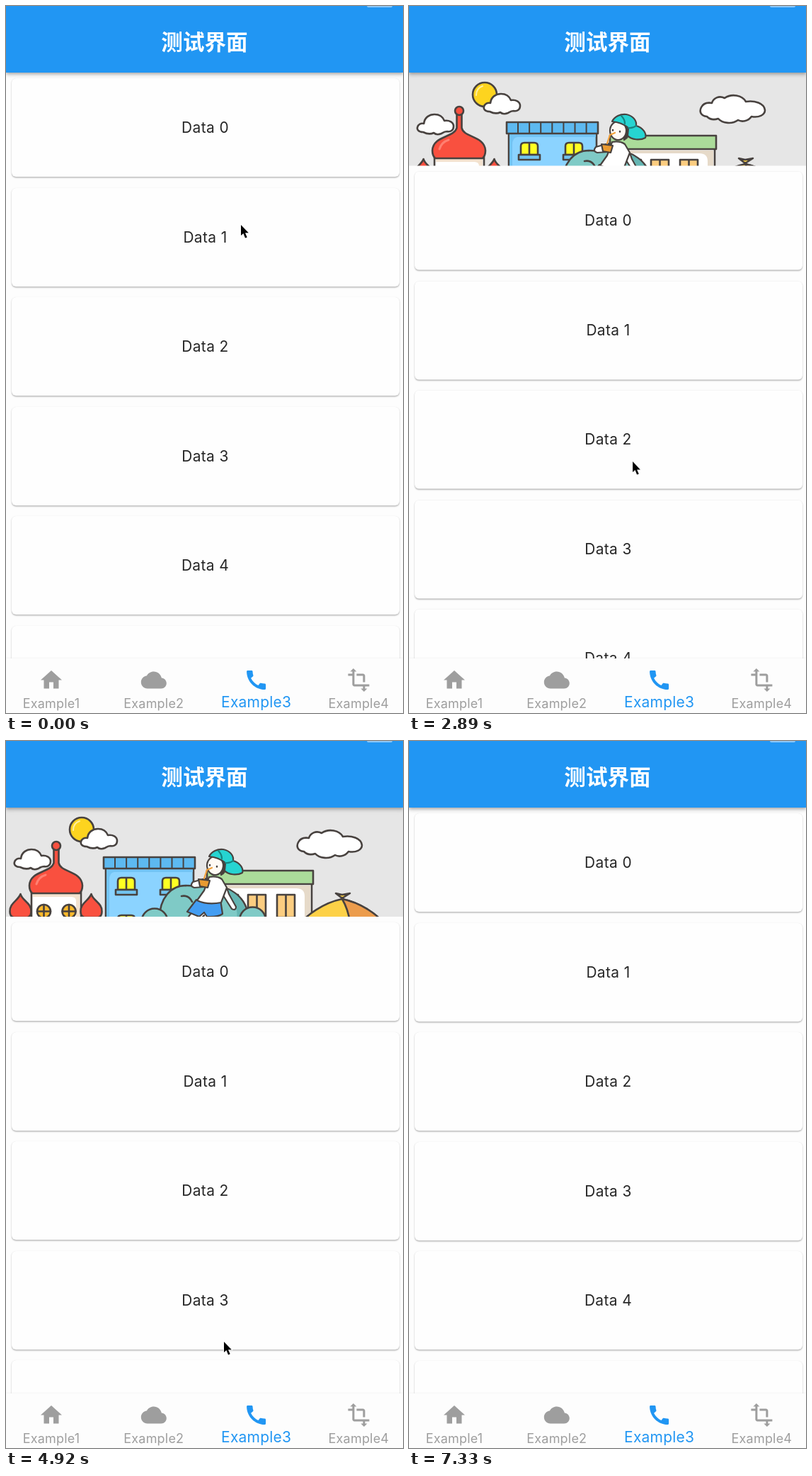
Write an HTML page that moves like this. It is 561x998 px and loops after 8 s.

```html
<!DOCTYPE html>
<html lang="zh">
<head>
<meta charset="utf-8">
<style>
html, body { margin: 0; width: 100%; height: 100%; overflow: hidden; background: #fdfdfd; }
body { position: relative; font-family: Inter, Roboto, sans-serif; }
body > * { position: absolute; left: 0; }
svg { display: block; top: 0; overflow: hidden; }
#list { top: 94px; width: 561px; height: 1000px; background: #fdfdfd; }
.card {
  position: absolute; left: 7.5px; width: 548px; height: 139px; border-radius: 6px;
  background: #fefefe; box-shadow: 0 1.5px 2px rgba(0,0,0,.27), 0 0 1px rgba(0,0,0,.1);
  font-size: 20.9px; letter-spacing: .4px; color: #262626;
  display: flex; align-items: center; justify-content: center;
}
#bar {
  top: 0; width: 561px; height: 94px; background: #2196f3;
  box-shadow: 0 2px 4px rgba(0,0,0,.25), 0 4px 6px rgba(0,0,0,.1);
  font: 600 30.6px/98px "Noto Sans CJK SC", "Noto Sans CJK", sans-serif; color: #fff; text-align: center;
}
#bar i { position: absolute; left: 510px; top: -3px; width: 36px; height: 5px; border-radius: 2px; background: #8ac6f8; }
#tabs { top: 921px; background: #fdfdfd; box-shadow: 0 -1px 2px rgba(0,0,0,.04); }
</style>
</head>
<body>
<svg id="scene" width="561" height="330">
  <defs>
    <path id="cloud" fill="#fff" d="M9 26C2 26 0 22 1 19c1-4 5-6 9-5C11 5 18 1 25 1s12 4 14 9c7-1 13 2 13 8 0 5-4 8-9 7-4 0-5 1-8 3-5 2-9 1-11-1-4 2-9 2-15-1Z"/>
    <g id="turret">
      <path fill="#fff" d="M-10 32H11V90H-10Z"/>
      <path fill="#fcc035" d="M-6 90V48a6.500 6.500 0 0 1 13 0V90M0 41V90M-6 50H7"/>
      <path fill="#f9503f" d="M0 0C2 9 16 13 15 25c0 4-2 7-5 8H-10c-3-1-5-4-5-8C-16 13-3 9 0 0Z"/>
    </g>
    <g id="rose" fill="#fcb92c"><circle r="9.500"/><path d="M-9.500 0H9.500M0-9.500V9.500"/></g>
    <g id="pane">
      <path fill="#ff2" d="M-12 8V-4Q-12-9-7-9H7Q12-9 12-4V8ZM0-9V8"/>
      <path fill="#72c4f0" d="M-15 8H15V15H-15Z"/>
    </g>
    <path id="shutter" fill="#fbcd80" d="M0 217h25v32H0ZM12.500 217v32"/>
  </defs>
  <rect y="90" width="561" height="240" fill="#e6e6e6"/>
  <g id="world" stroke="#48423f" stroke-width="2.600" stroke-linejoin="round" stroke-linecap="round" fill="none">
    <circle cx="107" cy="125" r="17" fill="#fdd41f"/>
    <path stroke="#fff0a0" stroke-width="2" d="M95 126q0-10 9-13"/>
    <g data-spread="7"><use href="#cloud" x="105" y="123"/></g>
    <g data-spread="5"><use href="#cloud" x="11" y="152"/></g>
    <g data-spread="11">
      <path fill="#fff" d="M421 156C412 155 410 149 413 143c3-6 9-7 15-6 2-7 10-11 18-7 10-7 25-4 30 5 12-2 26 2 27 12 0 7-9 11-19 9-5 7-14 8-19 5-8 6-22 5-28-2-6 2-12 1-16-3Z"/>
    </g>

    <g data-spread="-68">
      <path fill="#8bd3ff" d="M141 178H265V330H141Z"/>
      <path stroke="none" fill="#72c4f5" d="M142 181H264V185H153Q146 186 146 196V330H142Z"/>
      <path fill="#5db9f0" d="M138 164H267V180H138Z"/>
      <path d="M154 164v16m16.100-16v16m16.100-16v16m16.100-16v16m16.100-16v16m16.100-16v16m16.100-16v16" stroke-width="2"/>
      <use href="#pane" x="170" y="202"/><use href="#pane" x="233" y="202"/>
      <use href="#pane" x="170" y="255"/><use href="#pane" x="233" y="255"/>
      <path fill="#fff" d="M36 212H106V330H36Z"/>
      <path stroke="none" fill="#f3e2cf" d="M38 215H104V330H99V226Q99 220 92 220H38Z"/>
      <path fill="#f9503f" d="M67.500 152H74.500V172C77 186 107 183 108 204Q108 211 104 215H37Q33 211 33 204C34 183 64 186 67.500 172Z"/>
      <path stroke="#ff8071" stroke-width="3" d="M43 202q3-10 13-13"/>
      <circle cx="71" cy="148" r="6" fill="#f9503f"/>
      <use href="#rose" x="53.500" y="240.500"/><use href="#rose" x="89" y="240.500"/>
      <path fill="#fcc035" d="M46 330V272q7-14 14 0V330M82 330V272q7-14 14 0V330"/>
      <use href="#turret" x="20.500" y="216"/><use href="#turret" x="120.500" y="216"/>
    </g>

    <g data-spread="72">
      <path fill="#fff" d="M289 200H432V330H289Z"/>
      <path stroke="none" fill="#e6dac9" d="M291 204H430V330H422V219Q422 208 410 208H291Z"/>
      <path fill="#abdc9a" d="M284 183H434V202H284ZM289 264H432V276H289Z"/>
      <use href="#shutter" x="303"/><use href="#shutter" x="342"/><use href="#shutter" x="383"/>
      <path fill="#fdd147" d="M475 223C450 228 422 246 414 262q3 8 31 8l33 2 30-2q26-2 29-8C527 245 500 228 475 223Z"/>
      <path fill="#ec9c4c" d="M475 223C482 235 487 252 487 271l25-1q22-2 25-8C527 245 500 228 475 223Z"/>
      <path fill="#fdd147" d="M475 222L466 215 475 217 486 215Z"/>
    </g>

    <g fill="#7fcac6">
      <path d="M217 330V250C217 222 233 204 254 204Q266 205 280 204C315 200 342 222 342 250V330Z"/>
      <path stroke="none" fill="#64b5b2" d="M306 207C330 214 340 232 340 250V262L326 256Q330 224 306 207Z"/>
      <path d="M248 219q10-2 15 8M225 267q20-14 38-5"/>
      <circle cx="210" cy="255" r="18.500"/><circle cx="348.500" cy="253" r="18.500"/>
      <path stroke="none" d="M228 262H331V330H228Z"/>
      <path fill="#fff" d="M286 330V272q16-16 34 0V330Z"/>
    </g>
    <g stroke-width="2.200">
      <path fill="#fff" d="M264 240L239 273H254L280 246 267 275H280L297 244Z"/>
      <path fill="#439df2" d="M269 224L256 241 273 248 280 242 284 248Q299 249 306 244L303 224Z"/>
      <path fill="#fff" d="M302 199Q312 204 315 216L325 234Q325 240 319 237L305 215Z"/>
      <path fill="#fff" d="M282 194L264 199Q259 205 266 207L280 206Z"/>
      <path fill="#fff" d="M287 192Q298 190 305 195L312 207 304 228Q285 232 270 225L280 211Z"/>
      <path fill="#e99a31" d="M272 195L288 197 285 207 274 205Z"/>
      <path fill="#4a3c38" d="M303 168L311 173Q312 185 304 189Z"/>
      <ellipse cx="295.500" cy="176" rx="11.500" ry="13" fill="#fffaf4"/>
      <path stroke="#f2a13a" d="M280 194L284 182 291 179"/>
      <path stroke-width="2.500" d="M298 177v.5M288 175v.5"/>
      <path fill="#26d4d1" d="M287 163C290 156 299 152 307 153 317 155 322 162 321 169 331 172 336 180 334 186 327 190 314 189 309 183L310 172Q300 164 287 163Z"/>
      <path d="M310 172Q316 173 321 169M300 155q5 5 5 11" stroke="#16837f"/>
    </g>
  </g>
</svg>

<div id="list"></div>
<div id="bar">测试界面<i></i></div>
<svg id="tabs" width="561" height="77"></svg>
<svg id="cursor" width="18" height="26" viewBox="-2 -2 18 26">
  <path d="M0 0V15L3.400 12 6 18.500 8.700 17.400 6 11.300H10.800Z" stroke="#fff" stroke-width="1.600" paint-order="stroke"/>
</svg>

<script>
const LOOP = 8000, REST = 146, PULL = 154;
const RELEASE = 3950, REFRESH = 4980, CLOSE = 6600;
const $ = id => document.getElementById(id);

$('list').innerHTML = [0, 1, 2, 3, 4, 5].map(i =>
  `<div class="card" style="top:${8 + 154.6 * i}px">Data ${i}</div>`).join('');

// Material icons on a 24-unit grid
const icons = [
  'M10 20v-6h4v6h5v-8h3L12 3 2 12h3v8z',
  'M19.35 10.04C18.67 6.59 15.64 4 12 4 9.11 4 6.6 5.64 5.35 8.04 2.34 8.36 0 10.91 0 14c0 3.31 2.69 6 6 6h13c2.76 0 5-2.24 5-5 0-2.64-2.05-4.78-4.65-4.96z',
  'M20.01 15.38c-1.23 0-2.42-.2-3.53-.56-.35-.12-.74-.03-1.01.24l-1.57 1.97c-2.83-1.35-5.48-3.9-6.89-6.83l1.95-1.66c.27-.28.35-.67.24-1.02-.37-1.11-.56-2.3-.56-3.53 0-.54-.45-.99-.99-.99H4.19C3.65 3 3 3.24 3 3.99 3 13.28 10.73 21 20.01 21c.71 0 .99-.63.99-1.18v-3.45c0-.54-.45-.99-.99-.99z',
  'M22 18v-2H8V4h2L7 1 4 4h2v2H2v2h4v8c0 1.1.9 2 2 2h8v2h-2l3 3 3-3h-2v-2h4zM10 8h6v6h2V8c0-1.1-.9-2-2-2h-6v2z'
];
$('tabs').innerHTML = icons.map((d, i) => {
  const x = 64 + 144.8 * i, on = i === 2;
  return `<g fill="${on ? '#2196f3' : '#9e9e9e'}">
    <path d="${d}" transform="translate(${x - 18} 12.5) scale(1.5)"/>
    <text x="${x}" y="${on ? 69 : 70}" text-anchor="middle" font-size="${on ? 21 : 18}" letter-spacing=".2">Example${i + 1}</text></g>`;
}).join('');

const spreadGroups = document.querySelectorAll('[data-spread]');

// Linear interpolation through [time, ...values] points
function track(t, points) {
  const i = points.findIndex(p => p[0] > t);
  if (i < 0) return points[points.length - 1].slice(1);
  if (i === 0) return points[0].slice(1);
  const a = points[i - 1], b = points[i], k = (t - a[0]) / (b[0] - a[0]);
  return a.slice(1).map((v, n) => v + (b[n + 1] - v) * k);
}

// Critically damped fall from 1 to 0
function spring(t, start, tau) {
  const s = Math.max(0, t - start) / tau;
  return (1 + s) * Math.exp(-s);
}

const drag = [[1230, 0], [2260, 83.5], [3450, 174], [RELEASE, 186]];
const pointer = [
  [120, 332, 309], [240, 331, 294], [1230, 331, 294], [2260, 323, 484], [3450, 310, 784],
  [4000, 308, 848], [4920, 308, 848], [5400, 313, 796], [5800, 320, 800], [6230, 454, 982], [6420, 474, 1002]
];

function pullOffset(t) {
  if (t < RELEASE) return track(t, drag)[0];
  if (t >= 7330) return 0;
  return REST * spring(t, CLOSE, 80) + (PULL - REST) * spring(t, REFRESH, 140) + 32 * spring(t, RELEASE, 45);
}

function render(t) {
  const offset = pullOffset(t);
  $('list').style.transform = `translateY(${offset}px)`;
  const lift = t > REFRESH ? Math.min(0, offset - PULL) : 0;
  $('world').setAttribute('transform', `translate(0 ${lift})`);

  const phase = Math.min(1, Math.max(0, (t - 4960) / 840));
  const spread = Math.sin(Math.PI * phase) ** 2;
  spreadGroups.forEach(g => g.setAttribute('transform', `translate(${g.dataset.spread * spread} 0)`));

  const [x, y] = track(t, pointer);
  $('cursor').style.transform = `translate(${x - 2}px, ${y - 2}px)`;
}

function tick() {
  render(performance.now() % LOOP);
  requestAnimationFrame(tick);
}
tick();
</script>
</body>
</html>
```
